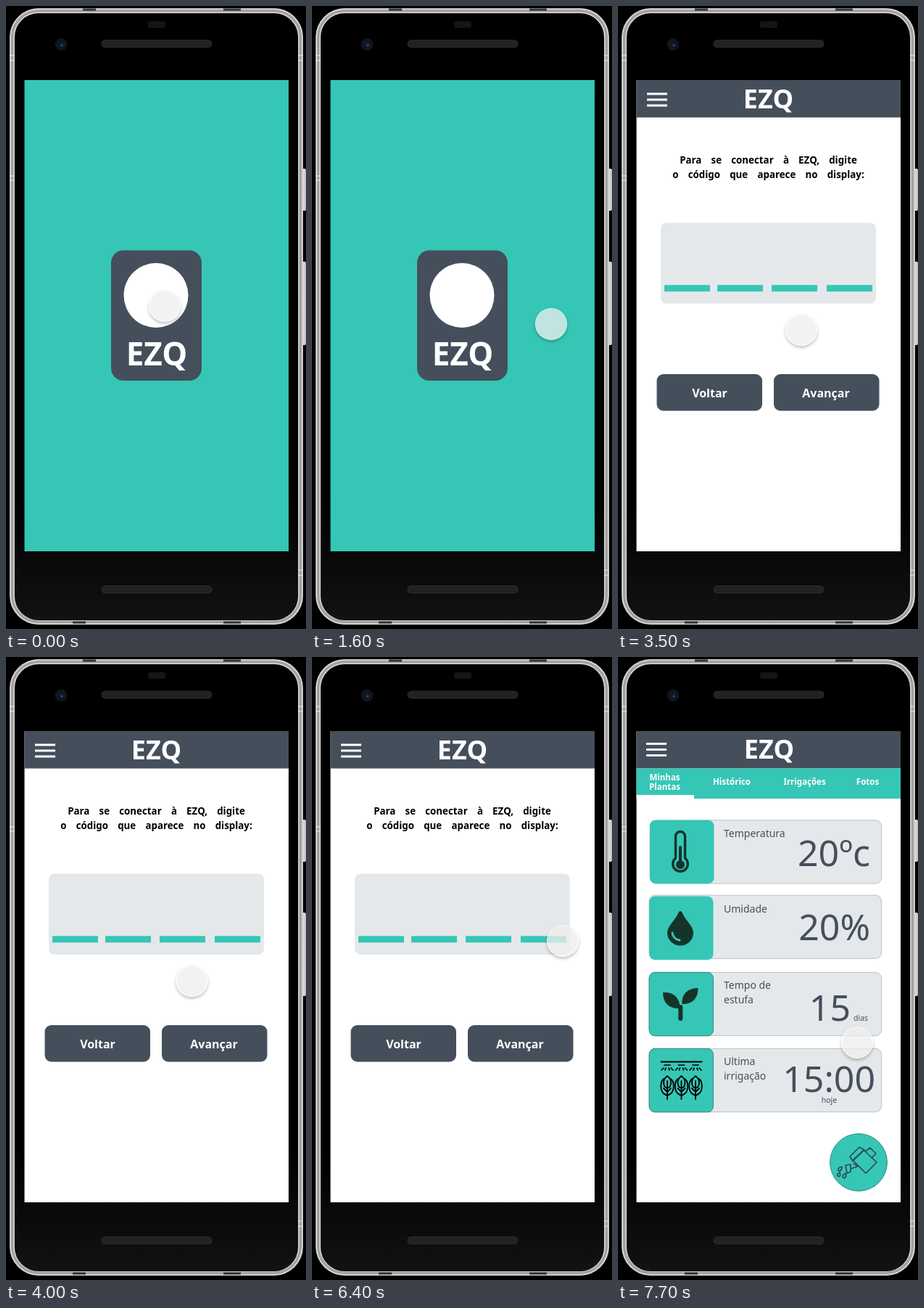
An HTML page with a canvas that plays this animation: 414x858 px, repeating every 8 s.

```html
<!DOCTYPE html>
<html lang="pt">
<head>
<meta charset="utf-8">
<title>App de estufa</title>
<style>
  html, body { margin: 0; width: 100%; height: 100%; overflow: hidden; background: #000; }
  canvas { position: absolute; left: 0; top: 0; width: 414px; height: 858px; }
  #touch {
    position: absolute; left: -22px; top: -22px; width: 44px; height: 44px;
    box-sizing: border-box; border-radius: 50%; border: 1.3px solid rgba(255, 255, 255, .85);
    background: rgba(238, 238, 238, .76); background-clip: padding-box;
    box-shadow: 0 2.5px 4px rgba(0, 0, 0, .25);
  }
</style>
</head>
<body>
<canvas id="stage"></canvas>
<div id="touch"></div>

<script>
  const LOOP = 8000, STEP = 100;
  const BRAND = "EZQ";
  const SLATE = "#454f5c", TEAL = "#36c6b6", PALE = "#e4e8eb", WHITE = "#fff", INK = "#153429";

  // Touch path: time in ms, x, y. Equal neighbours are pauses.
  const path = [
    [0, 219, 413], [300, 236, 449.5], [500, 236, 449.5], [600, 231.5, 466], [900, 231.5, 465],
    [1000, 237, 455], [1200, 256, 440], [1300, 256, 440], [1400, 275, 429], [1500, 305, 427],
    [1600, 330, 438], [2100, 330, 438], [2500, 261, 448.5], [2900, 261, 448.5], [3000, 253, 446],
    [3700, 253, 446], [4000, 256.5, 446], [5300, 256.5, 446], [5400, 245, 422], [5800, 165, 376],
    [6100, 127, 394], [6200, 127, 394], [6400, 346, 391], [6800, 346, 391], [7000, 344, 548],
    [7100, 344, 548], [7300, 330, 531], [LOOP, 330, 531]
  ];

  const stage = document.getElementById("stage");
  const touch = document.getElementById("touch");
  const ctx = stage.getContext("2d");
  const ratio = window.devicePixelRatio || 1;
  stage.width = 414 * ratio;
  stage.height = 858 * ratio;
  ctx.scale(ratio, ratio);
  ctx.lineJoin = "round";

  function paint(shape, fill, stroke, width = 1) {
    if (fill) { ctx.fillStyle = fill; ctx.fill(shape); }
    if (stroke) { ctx.strokeStyle = stroke; ctx.lineWidth = width; ctx.stroke(shape); }
  }

  function box(x, y, w, h, radius, fill, stroke, width) {
    const shape = new Path2D();
    shape.roundRect(x, y, w, h, radius);
    paint(shape, fill, stroke, width);
  }

  function disc(x, y, r, fill, stroke, width) {
    const shape = new Path2D();
    shape.arc(x, y, r, 0, 2 * Math.PI);
    paint(shape, fill, stroke, width);
  }

  function line(d, color, width, cap = "round") {
    ctx.lineCap = cap;
    paint(new Path2D(d), null, color, width);
  }

  function text(words, x, y, size, { color = SLATE, weight = 400, align = "left", gap = 0 } = {}) {
    ctx.font = `${weight} ${size}px "Noto Sans", "Open Sans", sans-serif`;
    ctx.wordSpacing = `${gap}px`;
    ctx.textAlign = align;
    ctx.fillStyle = color;
    ctx.fillText(words, x, y);
  }

  function title(words, x, y, size, color = WHITE, gap = 0) {
    text(words, x, y, size, { color, gap, weight: 700, align: "center" });
  }

  function blend(x0, y0, x1, y1, ...stops) {
    const gradient = ctx.createLinearGradient(x0, y0, x1, y1);
    stops.forEach(([offset, color]) => gradient.addColorStop(offset, color));
    return gradient;
  }

  function phone() {
    const key = blend(405, 0, 414, 0, [0, "#9a9a9a"], [.5, "#e6e6e6"], [1, "#bdbdbd"]);
    box(405, 224, 9, 58, 2, key);
    box(405, 352, 9, 115, 2, key);
    box(5, 3, 405, 849, 40, "#8d8d8d");
    box(6.2, 4.2, 402.6, 846.6, 39, null, "#d6d6d6", 2);
    box(9, 7, 397, 841, 36, null, "#a2a0a0", 3);
    box(11, 9, 393, 837, 34, null, "#d9d9d9", 1.5);
    box(12, 10, 391, 836, 33, blend(0, 10, 0, 846, [.8, "#000"], [1, "#121212"]));
    line("M5 68h7m-7 7h7M5 234h7m-7 6h7M403 68h7m-7 7h7M403 777h7m-7 7h7", "#eee", 1, "butt");
    line("M106 5h18M300 5h24M92 849h18M300 849h24", "#333", 3, "butt");
    for (const y of [47, 798.5]) box(132, y, 152, 10, 4.5, "#222", "#303030", .8);
    box(196, 21, 24, 9, 3, "#151515");
    disc(76, 53, 8.5, "#12141a");
    disc(76, 53, 4.5, "#0d1a2b");
    disc(77, 54, 1.5, "#34506c");
  }

  const panel = color => box(25.5, 102, 364.5, 649, 0, color);

  function header(dx, dy) {
    panel(WHITE);
    box(25.5, 102, 364.5, 51.5, 0, SLATE);
    for (const y of [121, 129, 137]) box(40 - dx, y - 1.5 + dy * 1.5, 28, 3, 0, WHITE);
    title(BRAND, 207.5 + dx, 141 + dy, 36);
  }

  function splash() {
    panel(TEAL);
    box(145, 336.5, 125, 179.5, 17, SLATE);
    disc(207, 398.5, 44.5, WHITE);
    title(BRAND, 208, 495, 44);
  }

  function pairing() {
    header(0, 0);
    title(`Para se conectar à ${BRAND}, digite`, 207.5, 217, 13.33, "#000", 9.7);
    title("o código que aparece no display:", 207.5, 237, 13.33, "#000", 9.7);
    box(59, 298.5, 297, 111.5, 8, PALE);
    for (const x of [64, 137, 212, 288]) box(x, 384.2, 63, 9, 0, TEAL);
    box(53.5, 507, 145.5, 50.5, 9, SLATE);
    box(215, 507, 145.5, 50.5, 9, SLATE);
    title("Voltar", 126.5, 539, 16);
    title("Avançar", 287, 539, 16);
  }

  function thermometer() {
    line("M79.5 277v-30a6.5 6.5 0 0 1 13 0v30a10.3 10.3 0 1 1-13 0z", INK, 3.4);
    line("M86 262v22", INK, 4);
    disc(86, 286, 6, INK);
  }

  function drop() {
    paint(new Path2D("M86 350c1.5 0 2.5 1.5 3 3 4 10 15 17 15 27a18 17.5 0 0 1-36 0c0-10 11-17 15-27 .5-1.5 1.5-3 3-3z"), INK);
    line("M75 380a11.5 11 0 0 0 10 10", TEAL, 3);
  }

  function sprout() {
    paint(new Path2D("M62 462c14-1 23 6 24 22-15 1-24-7-24-22zM110.5 456c0 14-7 22-22 22-1-14 8-22 22-22z"), INK);
    line("M86.3 482v16", INK, 6);
  }

  function irrigation() {
    line("M59.5 557.5h56", "#000", 2);
    for (const x of [68, 87.5, 107]) {
      ctx.save();
      ctx.translate(x, 0);
      line("M-4 562h8M-5 566l-3 3M-2 566l-1 3M2 566l1 3M5 566l3 3", "#000", 1.7);
      line("M0 609v-25M0 577c-4 3-5 6-5 9 0 4 2 7 5 8 3-1 5-4 5-8 0-3-1-6-5-9zM-5 581c-5 4-5 16 0 20 2 2 4 2 5 3 1-1 3-1 5-3 5-4 5-16 0-20M-5 594l5 5 5-5", "#000", 1.8);
      ctx.restore();
    }
  }

  function wateringCan() {
    disc(332, 696, 39.5, TEAL, "#2c6f70", .8);
    line("M324 693l15-14 18 17-15 15zM320 688l13-13 7 4-16 15zM341 681l7-5 8 8-6 6M325 698l7 3-11 4M314 700l7-1v10l-5 2zM332 701l4 4", "#2d4a52", 1.7);
    line("M309 702c-5 1-6 3-5 5s5 1 5-5zM306 710c-4 2-4 4-2 5s4-1 2-5zM314 711c-4 2-5 4-3 6s5-1 3-6z", "#2d4a52", 1.7);
  }

  function dashboard() {
    header(1, -1);
    box(25.5, 153.5, 364.5, 41.5, 0, TEAL);
    box(25.5, 190, 79.5, 5, 0, WHITE);
    title("Minhas", 64.5, 169.5, 11.5);
    title("Plantas", 64.5, 183, 11.5);
    title("Histórico", 157, 175.5, 11.5);
    title("Irrigações", 257.5, 175.5, 11.5);
    title("Fotos", 344.5, 175.5, 11.5);

    const cards = [
      [44, 224.7, 224.7, ["Temperatura"], 248, "20ºc", 348, 288],
      [43, 328, 329.5, ["Umidade"], 352, "20%", 348, 389.5],
      [43, 434.3, 434.3, ["Tempo de", "estufa"], 457, "15", 321, 501],
      [43, 539.3, 539.3, ["Ultima", "irrigação"], 562, "15:00", 355, 598.5]
    ];
    cards.forEach(([x, y, tileY, label, labelY, value, right, valueY], i) => {
      box(x, y, 363.5 - x, 87.3, 8, PALE, "#aeb5bb", .8);
      box(x, tileY, 88.5, 87.5, 8, TEAL, i > 1 ? "#2c6f70" : null, .8);
      label.forEach((words, row) => text(words, 146, labelY + 19.5 * row, 14));
      text(value, right, valueY, 50, { align: "right" });
    });
    text("dias", 325, 500.5, 10.5);
    text("hoje", 291.5, 614, 10.5, { align: "center" });

    thermometer();
    drop();
    sprout();
    irrigation();
    wateringCan();
  }

  function positionAt(time) {
    const i = path.findIndex(point => point[0] > time);
    const [t0, x0, y0] = path[i - 1], [t1, x1, y1] = path[i];
    const k = (time - t0) / (t1 - t0);
    return [x0 + (x1 - x0) * k, y0 + (y1 - y0) * k];
  }

  function draw(now) {
    const time = Math.floor(now % LOOP / STEP) * STEP;
    ctx.clearRect(0, 0, 414, 858);
    phone();
    if (time < 3500) splash();
    else if (time < 7700) pairing();
    else dashboard();
    const [x, y] = positionAt(time);
    touch.style.transform = `translate(${x}px, ${y}px)`;
  }

  const start = performance.now();
  function frame() {
    draw(performance.now() - start);
    requestAnimationFrame(frame);
  }
  frame();
</script>
</body>
</html>
```
